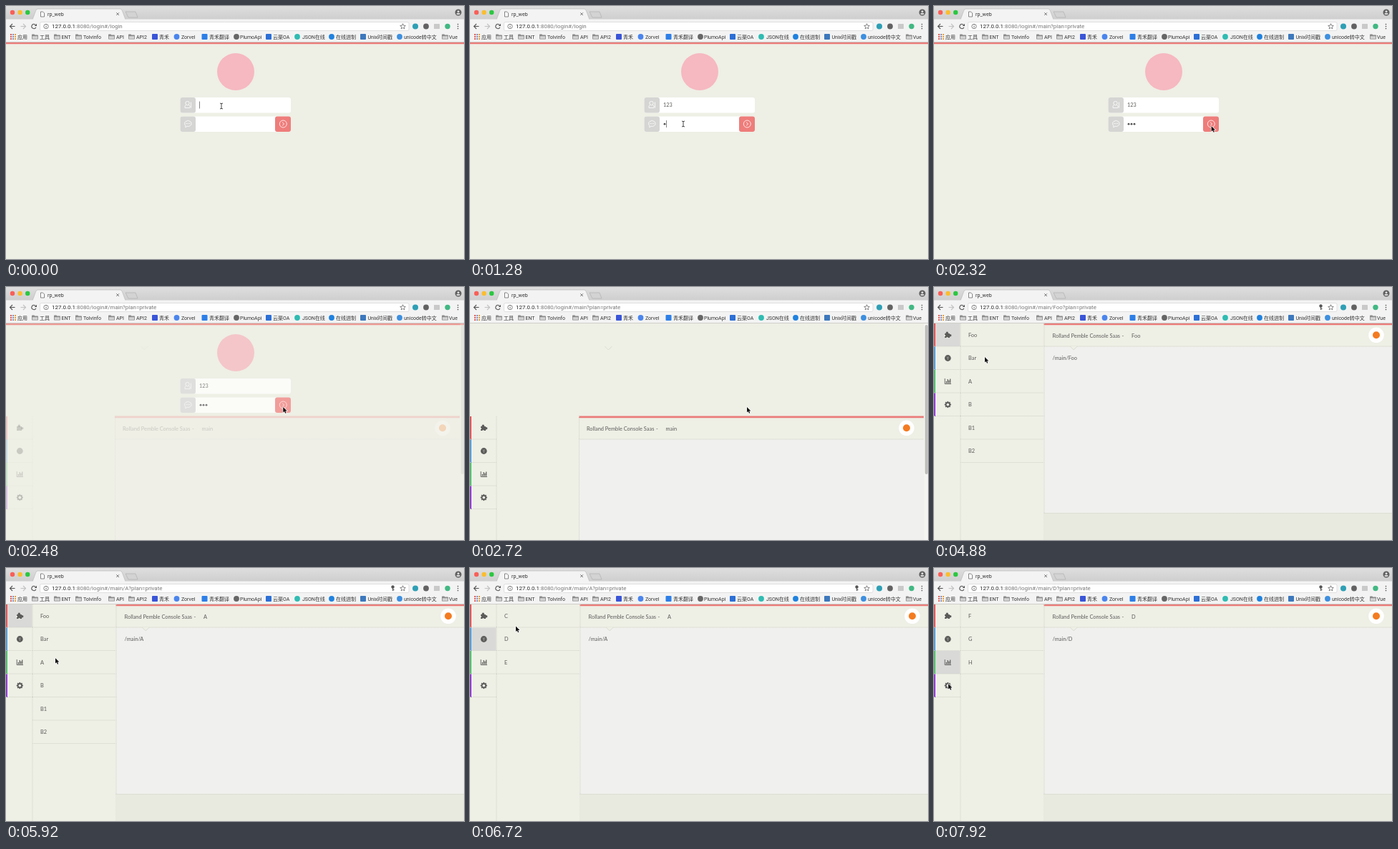
Write an HTML page with a canvas that moves like this. It is 640 px wide and 354 px high and loops after 8000 ms.

```html
<!DOCTYPE html>
<html lang="zh">
<head>
<meta charset="utf-8">
<title>rp_web</title>
<style>
html, body { margin: 0; width: 100%; height: 100%; overflow: hidden; background: #eeefe5; }
canvas { display: block; width: 640px; height: 354px; }
</style>
</head>
<body>
<canvas id="stage"></canvas>
<script>
const W = 640, H = 354, LOOP = 8000, STEP = 80, ROW = 32.5, TOP = 51;
const canvas = document.getElementById('stage');
const c = canvas.getContext('2d');
const dpr = window.devicePixelRatio || 1;
canvas.width = W * dpr;
canvas.height = H * dpr;

const UI = 'Roboto, "Noto Sans CJK SC", "Noto Sans CJK", sans-serif';
const PAGE = 'Lato, sans-serif';
const BG = '#eeefe5', INK = '#5c5c5a', RED = '#ea7b79', DOTS = '#cfd0c5';

const bookmarks = [
  ['grid', 6, '应用', 16], ['folder', 36, '工具', 47], ['folder', 67, 'ENT', 77.5],
  ['folder', 97, 'Tolvinfo', 108], ['folder', 143, 'API', 154], ['folder', 171, 'API2', 182],
  ['square', 204, '青禾', 214, '#3a55d8'], ['circle', 234.5, 'Zorvel', 245, '#4a85ee'],
  ['square', 273.5, '青禾翻译', 284, '#2d7fe8'], ['circle', 318, 'PlumoApi', 327, '#666'],
  ['square', 363, '云渠OA', 373, '#2c6fd6'], ['circle', 403, 'JSON在线', 414, '#2fbcb2'],
  ['circle', 451, '在线进制', 461, '#1f82e0'], ['square', 495, 'Unix时间戳', 505.5, '#3d78bd'],
  ['circle', 546, 'unicode转中文', 556, '#3d8fe0'], ['folder', 609, 'Vue', 619]
];

const routes = [[0, 'login'], [2240, 'main'], [4400, 'Foo'], [5040, 'Bar'], [5840, 'A'], [7120, 'D']];
const menus = [
  [0, -1, []],
  [3760, 0, ['Foo', 'Bar', 'A', 'B', 'B1', 'B2']],
  [6320, 1, ['C', 'D', 'E']],
  [7520, 2, ['F', 'G', 'H']]
];
const pointer = [
  [0, 301, 140], [640, 301, 140], [880, 298, 165], [1520, 298, 165], [1640, 313, 163],
  [1760, 364, 167], [2000, 388, 168], [2720, 387, 168], [2840, 387, 168], [3440, 30, 75],
  [3600, 21, 68], [3840, 21, 68], [4000, 66, 68], [4480, 68, 70], [4880, 71, 98],
  [5160, 71, 98], [5440, 76, 130], [5840, 78, 131], [6160, 20, 99], [6520, 20, 99],
  [6720, 64, 81.5], [6960, 60, 98], [7200, 60, 98], [7440, 22, 131], [7640, 21, 131], [7920, 20, 162]
];
const userKeys = [240, 400, 560], passKeys = [1200, 1360, 1520];
const FADE_START = 2400, FADE_END = 2720, SETTLE = 2800;

const latest = (list, t) => list.filter(e => e[0] <= t).pop();
const typed = (keys, t) => keys.filter(k => k <= t).length;
const clamp = v => Math.max(0, Math.min(1, v));

function pointerAt(t) {
  const i = pointer.findIndex(p => p[0] > t);
  if (i < 0) return pointer[pointer.length - 1].slice(1);
  const [t0, x0, y0] = pointer[i - 1], [t1, x1, y1] = pointer[i];
  const u = (t - t0) / (t1 - t0), e = u * u * (3 - 2 * u);
  return [x0 + (x1 - x0) * e, y0 + (y1 - y0) * e];
}

function rect(x, y, w, h, fill, radius = 0) {
  c.fillStyle = fill;
  c.beginPath();
  c.roundRect(x, y, w, h, radius);
  c.fill();
}

function circle(x, y, r, fill) {
  c.fillStyle = fill;
  c.beginPath();
  c.arc(x, y, r, 0, 7);
  c.fill();
}

function ring(x, y, r, color, width = 1, from = 0, to = 7) {
  c.strokeStyle = color;
  c.lineWidth = width;
  c.beginPath();
  c.arc(x, y, r, from, to);
  c.stroke();
}

function line(points, color, width = 1, dash = []) {
  c.strokeStyle = color;
  c.lineWidth = width;
  c.setLineDash(dash);
  c.beginPath();
  points.forEach(([x, y]) => c.lineTo(x, y));
  c.stroke();
  c.setLineDash([]);
}

function polygon(points, fill) {
  c.fillStyle = fill;
  c.beginPath();
  points.forEach(([x, y]) => c.lineTo(x, y));
  c.closePath();
  c.fill();
}

const dotted = (x0, y0, x1, y1) => line([[x0, y0], [x1, y1]], DOTS, 1, [1, 1]);

function text(s, x, y, size, color, family) {
  c.font = `${size}px ${family}`;
  c.fillStyle = color;
  c.fillText(s, x, y);
  return c.measureText(s).width;
}

function bookmarkIcon(kind, x, color) {
  if (kind === 'circle') circle(x + 4, 43, 3.9, color);
  else if (kind === 'square') rect(x, 39, 8, 8, color, 1);
  else if (kind === 'grid') {
    const tones = ['#e2574c', '#7a8fc4', '#e8a13c'];
    for (let i = 0; i < 9; i++) rect(x + i % 3 * 3, 39 + Math.floor(i / 3) * 3, 2, 2, tones[i % 3]);
  } else {
    rect(x, 39.6, 4, 2.5, '#8b8b8b', 0.8);
    rect(x, 40.5, 9, 6, '#8b8b8b', 0.8);
    rect(x + 0.8, 42.2, 7.4, 3.6, '#d2d2d2');
  }
}

function drawTabs() {
  const strip = c.createLinearGradient(0, 0, 0, 19);
  strip.addColorStop(0, '#dedede');
  strip.addColorStop(1, '#cecece');
  rect(0, 0, W, 19, strip);
  ['#f95f58', '#fbbd2f', '#2bc840'].forEach((color, i) => circle(9 + i * 10.6, 9, 3.2, color));
  const tab = [[37, 19], [42, 5.5], [44, 4], [160, 4], [162, 5.5], [167, 19]];
  polygon(tab, '#f3f3f3');
  line(tab, '#b4b4b4', 0.6);
  const add = [[167, 8], [181, 8], [184, 16], [171, 16], [167, 8]];
  polygon(add, '#d3d3d3');
  line(add, '#b0b0b0', 0.7);
  polygon([[48.5, 8], [51.5, 8], [53.5, 10], [53.5, 15], [48.5, 15]], '#fff');
  line([[51.5, 8], [48.5, 8], [48.5, 15], [53.5, 15], [53.5, 10], [51.5, 8]], '#666', 0.8);
  text('rp_web', 58, 13.7, 7.1, '#333', UI);
  line([[154.3, 9.3], [158, 13]], '#666', 0.9);
  line([[158, 9.3], [154.3, 13]], '#666', 0.9);
  circle(632, 9, 4.5, '#5f5f5f');
  circle(632, 7.7, 1.5, '#ddd');
  rect(629.5, 10, 5, 2, '#ddd', 1);
}

function arrowIcon(x, dir, color) {
  line([[x - 3.5 * dir, 28.5], [x + 3.5 * dir, 28.5]], color, 1.1);
  line([[x, 25], [x + 3.5 * dir, 28.5], [x, 32]], color, 1.1);
}

function drawToolbar(route) {
  rect(0, 18.5, W, 32, '#f3f3f3');
  arrowIcon(9, -1, '#555');
  arrowIcon(24, 1, '#c2c2c2');
  ring(39, 28.5, 3.1, '#555', 1.1, 0.4, 5.5);
  polygon([[39.8, 28], [43, 28], [43, 24.8]], '#555');
  rect(47.5, 22.5, 515.5, 12, '#fff', 2);
  c.strokeStyle = '#d4d4d4';
  c.lineWidth = 0.7;
  c.stroke();
  ring(56, 28.5, 3.2, '#666', 0.8);
  rect(55.6, 28, 0.9, 2.3, '#666');
  rect(55.6, 26.3, 0.9, 0.9, '#666');

  const hostWidth = text('127.0.0.1', 64, 31.3, 7.95, '#222', UI);
  const path = route === 'login' ? 'login'
    : (route === 'main' ? 'main' : 'main/' + route) + '?plan=private';
  text(':8080/login#/' + path, 64 + hostWidth, 31.3, 7.95, '#777', UI);

  if (!['login', 'main'].includes(route)) {
    circle(540.5, 26.5, 2.2, '#555');
    rect(540, 27, 1.2, 5, '#555');
    rect(541, 30, 1.5, 1, '#555');
  }
  const star = Array.from({ length: 11 }, (_, i) => {
    const a = -Math.PI / 2 + i * Math.PI / 5, r = i % 2 ? 1.8 : 4;
    return [554.5 + r * Math.cos(a), 28.7 + r * Math.sin(a)];
  });
  line(star, '#666', 0.8);
  circle(572, 28.5, 4, '#2d9fb5');
  circle(587, 28.5, 3.9, '#626262');
  rect(598, 25, 8, 7, '#c9c9c9', 0.5);
  circle(617, 28.5, 3.7, '#41b883');
  [25.5, 28.5, 31.5].forEach(y => circle(631.5, y, 0.85, '#555'));
  bookmarks.forEach(([kind, x, label, tx, color]) => {
    bookmarkIcon(kind, x, color);
    text(label, tx, 45.6, 7, '#333', UI);
  });
  rect(0, 50, W, 0.7, '#c4c4c0');
}

function caret(x, y, t) {
  if (t % 1000 < 500) rect(x, y, 0.8, 10, '#666');
}

function drawLogin(t) {
  rect(0, 50.5, W, 2.8, RED);
  circle(321, 92, 26, '#f6b8c1');
  rect(243.5, 128, 154.5, 21.5, '#fff', 3);
  rect(243.5, 154.5, 154.5, 21.5, '#fff', 3);
  [128, 154.5].forEach(y => rect(243.5, y, 21.5, 21.5, '#d5d5d4', 3));
  rect(376, 154.5, 22, 21.5, '#ee7d7b', 3);

  ring(253.5, 136, 2.7, '#fff', 0.8);
  line([[251.5, 138.5], [250, 140], [250, 142.5], [257, 142.5], [257, 140], [255.5, 138.5]], '#fff', 0.8);
  line([[258.5, 134.5], [258.5, 142.5]], '#fff', 0.8);
  c.strokeStyle = '#fff';
  c.lineWidth = 0.8;
  c.beginPath();
  c.ellipse(254.3, 164.5, 4.8, 4, 0, 2.4, 8.2);
  c.lineTo(251, 170);
  c.closePath();
  c.stroke();
  [252, 254.3, 256.6].forEach(x => circle(x, 164.5, 0.65, '#fff'));
  ring(387.3, 165, 5, '#fff', 0.8);
  line([[386.2, 162.8], [388.6, 165], [386.2, 167.2]], '#fff', 0.9);

  const user = typed(userKeys, t), pass = typed(passKeys, t);
  const userWidth = text('123'.slice(0, user), 270, 141.4, 7.3, INK, PAGE);
  for (let i = 0; i < pass; i++) circle(272 + i * 4, 165.2, 1.4, '#555');
  if (t < 960) caret(270 + userWidth, 133.5, t);
  else if (t < 2080) caret(270 + pass * 4, 160, t - 960);
}

function sideIcon(i, y) {
  const x = 19;
  if (i === 0) {
    rect(x - 4, y - 2, 7, 6, INK, 0.5);
    circle(x - 0.7, y - 2.8, 1.7, INK);
    circle(x + 3.7, y + 0.8, 1.7, INK);
    circle(x - 4, y + 1, 1.1, BG);
    circle(x - 0.5, y + 4, 1.1, BG);
  } else if (i === 1) {
    circle(x + 0.3, y, 4.4, INK);
    line([[x - 1, y - 2], [x + 0.3, y], [x + 1.6, y - 2]], '#c9c9c2', 0.6);
    line([[x + 0.3, y], [x + 0.3, y + 2.4]], '#c9c9c2', 0.6);
  } else if (i === 2) {
    line([[x - 3.8, y - 4], [x - 3.8, y + 3.5], [x + 5, y + 3.5]], INK, 0.9);
    [2.5, 5.5, 4, 6].forEach((h, k) => rect(x - 2.3 + k * 1.8, y + 2.6 - h, 1.2, h, INK));
  } else {
    for (let k = 0; k < 8; k++) {
      const a = k * Math.PI / 4, ux = Math.cos(a), uy = Math.sin(a);
      line([[x + 0.3 + ux * 2.6, y + uy * 2.6], [x + 0.3 + ux * 4.6, y + uy * 4.6]], INK, 1.8);
    }
    ring(x + 0.3, y, 2.7, INK, 1.7);
  }
}

function drawMain(t, route, stacked) {
  const dy = stacked ? 130 : 0, right = stacked ? 634 : W;
  const left = right * 0.24, top = TOP + dy;
  const [, active, items] = latest(menus, t);

  rect(left, top, right - left, ROW, BG);
  rect(left, top + ROW, right - left, H, '#f0f0ee');
  rect(left, top - 0.5, right - left, 2.8, RED);
  dotted(left, top + ROW - 0.5, right, top + ROW - 0.5);
  dotted(left + 0.4, top, left + 0.4, H);
  dotted(37, top, 37, H);
  if (!stacked) {
    rect(left, 316.5, right - left, H - 316.5, '#e8e9df');
    dotted(left, 316.5, right, 316.5);
  }

  const notch = right * 0.305;
  const chevron = [[notch - 5, 83], [notch, 88], [notch + 5, 83]];
  polygon(chevron, BG);
  line(chevron, '#d6d7cd', 0.8);

  ['#e2595b', '#5a9fd8', '#56c270', '#933fd5'].forEach((color, i) => {
    const y = top + i * ROW;
    if (i === active) rect(0, y, 36.5, ROW - 0.5, '#d9d9d8');
    rect(0, y, 2, ROW, color);
    dotted(0, y + ROW - 0.5, 37, y + ROW - 0.5);
    sideIcon(i, y + 16);
  });
  items.forEach((label, i) => {
    const y = top + i * ROW;
    text(label, 48, y + 18.6, 7.4, INK, PAGE);
    dotted(37, y + ROW - 0.5, left, y + ROW - 0.5);
  });

  const title = top + 19.8, x = left + (stacked ? 10.8 : 12);
  text('Rolland Pemble Console Saas', x, title, 7.4, INK, PAGE);
  text('-', x + 97, title, 7.4, INK, PAGE);
  text(route, x + 110.5, title, 7.4, INK, PAGE);
  if (route !== 'main') text('/main/' + route, x, 102.2, 7.4, INK, PAGE);

  const ax = right - (stacked ? 24 : 22);
  circle(ax, top + 16.3, 10.8, '#fff');
  circle(ax, top + 16.3, 5, '#f47b20');
  if (stacked) {
    rect(634.5, TOP, 5.5, H, '#f4f4f2');
    rect(635.8, 53, 4, 209, '#bdbdbb', 2);
  }
}

function drawPointer(t) {
  const [x, y] = pointerAt(t);
  if (t < FADE_START && x > 265 && x < 376) {
    const beam = [
      [[x - 2, y - 4], [x, y - 3.3], [x + 2, y - 4]],
      [[x, y - 3.3], [x, y + 3.3]],
      [[x - 2, y + 4], [x, y + 3.3], [x + 2, y + 4]]
    ];
    beam.forEach(stroke => line(stroke, '#333', 0.9));
    return;
  }
  const shape = [[0, 0], [0, 7.6], [1.8, 6], [3, 8.8], [4.3, 8.2], [3.1, 5.5], [5.5, 5.4], [0, 0]]
    .map(([px, py]) => [x + px, y + py]);
  line(shape, '#fff', 1.3);
  polygon(shape, '#111');
}

function render(now) {
  const t = Math.floor(now % LOOP / STEP) * STEP;
  const route = latest(routes, t)[1];
  const fade = clamp((t - FADE_START) / (FADE_END - FADE_START));
  c.setTransform(dpr, 0, 0, dpr, 0, 0);
  rect(0, 0, W, H, BG);
  if (fade < 1) {
    c.globalAlpha = 1 - fade;
    drawLogin(t);
  }
  if (fade > 0) {
    c.globalAlpha = fade;
    drawMain(t, route, t < SETTLE);
  }
  c.globalAlpha = 1;
  drawTabs();
  drawToolbar(route);
  drawPointer(t);
}

const start = performance.now();
function tick() {
  render(performance.now() - start);
  requestAnimationFrame(tick);
}
tick();
</script>
</body>
</html>
```
